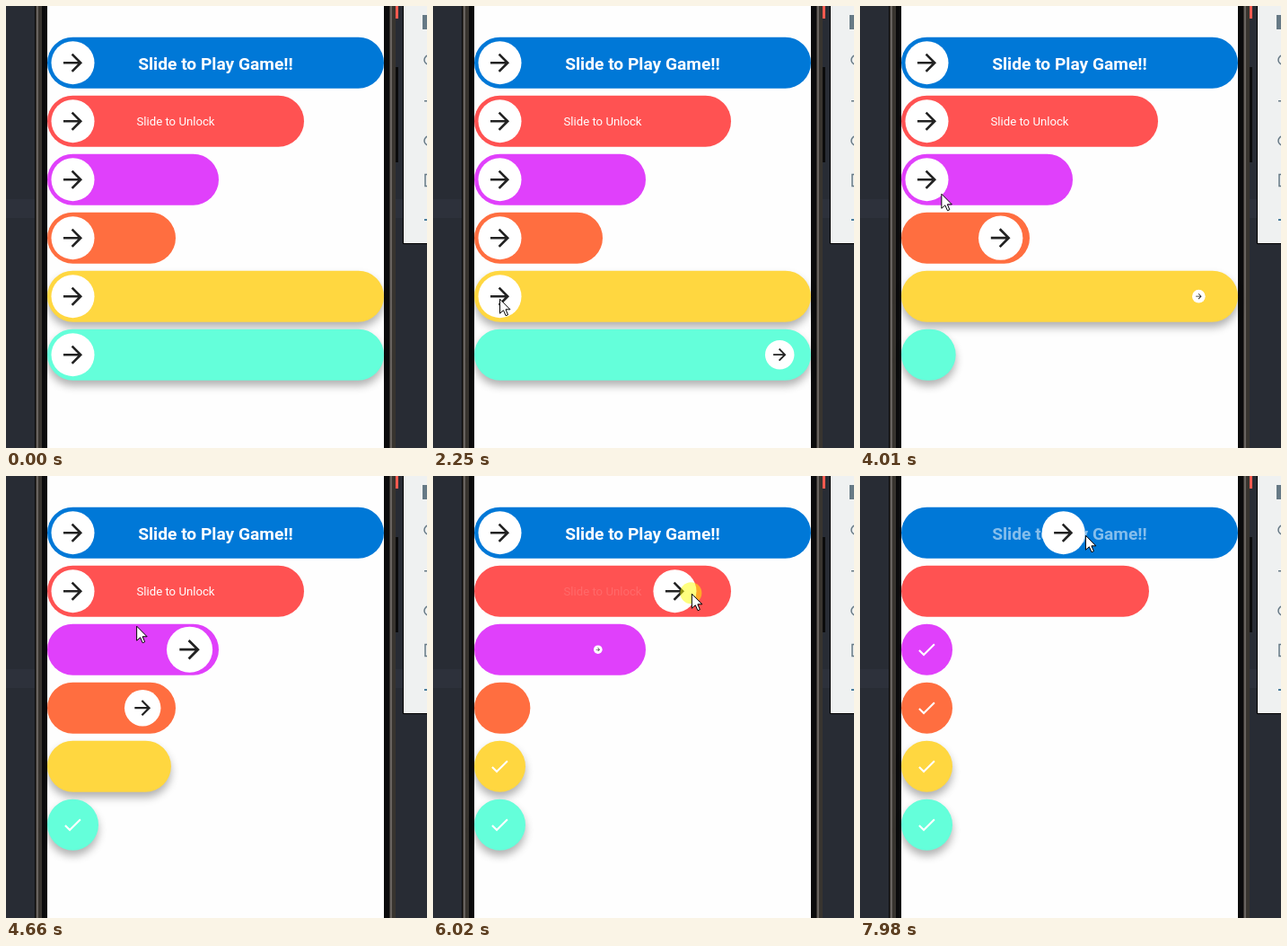
Write an HTML page with a canvas that moves like this. It is 469 px wide and 492 px high and loops after 8000 ms.

```html
<!DOCTYPE html>
<html lang="en">
<head>
<meta charset="utf-8">
<style>
  html, body { margin: 0; width: 100%; height: 100%; overflow: hidden; background: #282c34; }
  canvas { display: block; }
</style>
</head>
<body>
<canvas id="stage" width="469" height="492"></canvas>
<script>
const ctx = document.getElementById('stage').getContext('2d');
const LOOP = 8000;
const LEFT = 46, HEIGHT = 57, KNOB = 24, HOME = 74.5;
const LAG = 70, RESIZE = 1100, SHRINK = 1250, REVEAL = 300;

const ARROW = new Path2D('M12 4l-1.41 1.41L16.17 11H4v2h12.17l-5.58 5.59L12 20l8-8z');
const CHECK = new Path2D('M9 16.17L4.83 12l-1.42 1.41L9 19 21 7l-1.41-1.41z');
const POINTER = new Path2D('M0 0V16L4 12.6 6.6 18.5 9 17.5 6.5 11.6H11.5Z');

// The pointer holds a knob from grab to drop and pulls it to reach; shrink starts the closing.
const sliders = [
  { width: 375, color: '#0078d7', grab: 7480, drop: 8382, reach: 393, shrink: Infinity,
    label: 'Slide to Play Game!!', size: 19.2, weight: 'bold' },
  { width: 286, color: '#ff5252', grab: 5230, drop: 6064, reach: 300, shrink: 7979.8,
    label: 'Slide to Unlock', size: 13.2, weight: 'normal' },
  { width: 191, color: '#e040fb', grab: 4120, drop: 4313, reach: 203, shrink: 6070 },
  { width: 143, color: '#ff6e40', grab: 3270, drop: 3780, reach: 156, shrink: 5205 },
  { width: 375, color: '#ffd740', grab: 2400, drop: 2920, reach: 394, shrink: 4244, raised: true },
  { width: 375, color: '#64ffda', grab: 793, drop: 1288, reach: 394, shrink: 2950, raised: true }
];
sliders.forEach((s, i) => s.y = 63.2 + 65 * i);

const mix = (a, b, p) => a + (b - a) * p;
const phase = (t, start, duration) => Math.min(1, Math.max(0, (t - start) / duration));
const easeInBack = p => p * p * (2.70158 * p - 1.70158);
const easeOutCirc = p => Math.sqrt(1 - (p - 1) ** 2);
const pulledTo = (s, t) => mix(HOME, s.reach, phase(t, s.grab, s.drop - s.grab));

function rect(color, x, y, w, h) {
  ctx.fillStyle = color;
  ctx.fillRect(x, y, w, h);
}

function disc(color, x, y, r) {
  ctx.fillStyle = color;
  ctx.beginPath();
  ctx.arc(x, y, r, 0, Math.PI * 2);
  ctx.fill();
}

function icon(path, color, x, y, scale) {
  ctx.save();
  ctx.translate(x, y);
  ctx.scale(scale, scale);
  ctx.translate(-12, -12);
  ctx.fillStyle = color;
  ctx.fill(path);
  ctx.restore();
}

function drawPanel() {
  rect('#000', 442, 0, 27, 265);
  rect('#eff1f1', 443, 0, 26, 264);
  rect('#667985', 464, 10, 5, 16);
  rect('#667985', 466, 105, 3, 1.5);
  rect('#4a7d9c', 466, 237, 3, 2);
  ctx.strokeStyle = '#667985';
  ctx.lineWidth = 1.5;
  for (const y of [60, 150]) {
    ctx.beginPath();
    ctx.arc(471, y, 5, 0, Math.PI * 2);
    ctx.stroke();
  }
  ctx.strokeRect(467, 187.5, 8, 13);
}

function drawBackdrop() {
  rect('#282c34', 0, 0, 469, 492);
  rect('#2d313b', 0, 215, 469, 21);
  rect('#0b0b0c', 32, 0, 402, 492);
  for (const x of [33, 427]) {
    rect('#38342f', x, 0, 7, 492);
    rect('#68635f', x + 1, 0, 2, 492);
  }
  rect('#fefefe', LEFT, 0, 375, 492);
  rect('#ff5a4f', 434, 0, 3, 14);
  rect('#0b0b0c', 434, 68, 3, 106);
  drawPanel();
}

function drawPill(s, width) {
  ctx.save();
  if (s.raised) {
    ctx.shadowColor = 'rgba(0,0,0,.3)';
    ctx.shadowBlur = 10;
    ctx.shadowOffsetY = 6;
  }
  ctx.fillStyle = s.color;
  ctx.beginPath();
  ctx.roundRect(LEFT, s.y - HEIGHT / 2, width, HEIGHT, HEIGHT / 2);
  ctx.fill();
  ctx.restore();
}

function drawLabel(s, x) {
  ctx.globalAlpha = Math.max(0, 1 - (x - HOME) / (s.reach - HOME));
  ctx.font = `${s.weight} ${s.size}px Roboto, sans-serif`;
  ctx.textAlign = 'center';
  ctx.fillStyle = '#fff';
  ctx.fillText(s.label, LEFT + s.width / 2, s.y + s.size * .39);
  ctx.globalAlpha = 1;
}

function drawKnob(s, x, t) {
  const scale = Math.max(.2, 1 - easeInBack(phase(t, s.drop + LAG, RESIZE)));
  const center = x - KNOB * (1 - scale);
  disc('#fff', center, s.y, KNOB * scale);
  icon(ARROW, '#222', center, s.y, 1.32 * scale);
}

function drawCheck(s, progress) {
  ctx.save();
  ctx.beginPath();
  ctx.rect(LEFT, s.y - 20, 18 + 22 * progress, 40);
  ctx.clip();
  icon(CHECK, '#fff', HOME - .3, s.y, 1.05);
  ctx.restore();
}

function drawSlider(s, t) {
  const shrink = phase(t, s.shrink, SHRINK);
  const reveal = phase(t, s.shrink + SHRINK, REVEAL);
  drawPill(s, mix(s.width, HEIGHT, easeOutCirc(shrink)));
  if (!shrink) {
    const x = pulledTo(s, t - LAG);
    if (s.label) drawLabel(s, x);
    drawKnob(s, x, t);
  }
  if (reveal) drawCheck(s, reveal);
}

// Visits the sliders from the bottom up: travel to the knob, rest, drag.
function pointerAt(t) {
  let from = { x: 402, y: 468, time: 100 };
  for (const s of [...sliders].reverse()) {
    const y = s.y + 3;
    if (t < s.grab) {
      const p = phase(t, from.time, (s.grab - from.time) * .85);
      return { x: mix(from.x, HOME, p), y: mix(from.y, y, p) };
    }
    if (t <= s.drop) return { x: pulledTo(s, t), y, pressed: s.drop < LOOP };
    from = { x: s.reach, y, time: s.drop };
  }
}

function drawPointer(t) {
  if (t < 100) return;
  const { x, y, pressed } = pointerAt(t);
  if (pressed) disc('rgba(255,255,0,.5)', x - 1, y - 1, 12);
  ctx.save();
  ctx.translate(x, y);
  ctx.fillStyle = '#fff';
  ctx.strokeStyle = '#000';
  ctx.lineWidth = 1;
  ctx.fill(POINTER);
  ctx.stroke(POINTER);
  ctx.restore();
}

const start = performance.now();
function frame() {
  const t = (performance.now() - start) % LOOP;
  drawBackdrop();
  sliders.forEach(s => drawSlider(s, t));
  drawPointer(t);
  requestAnimationFrame(frame);
}
frame();
</script>
</body>
</html>
```
